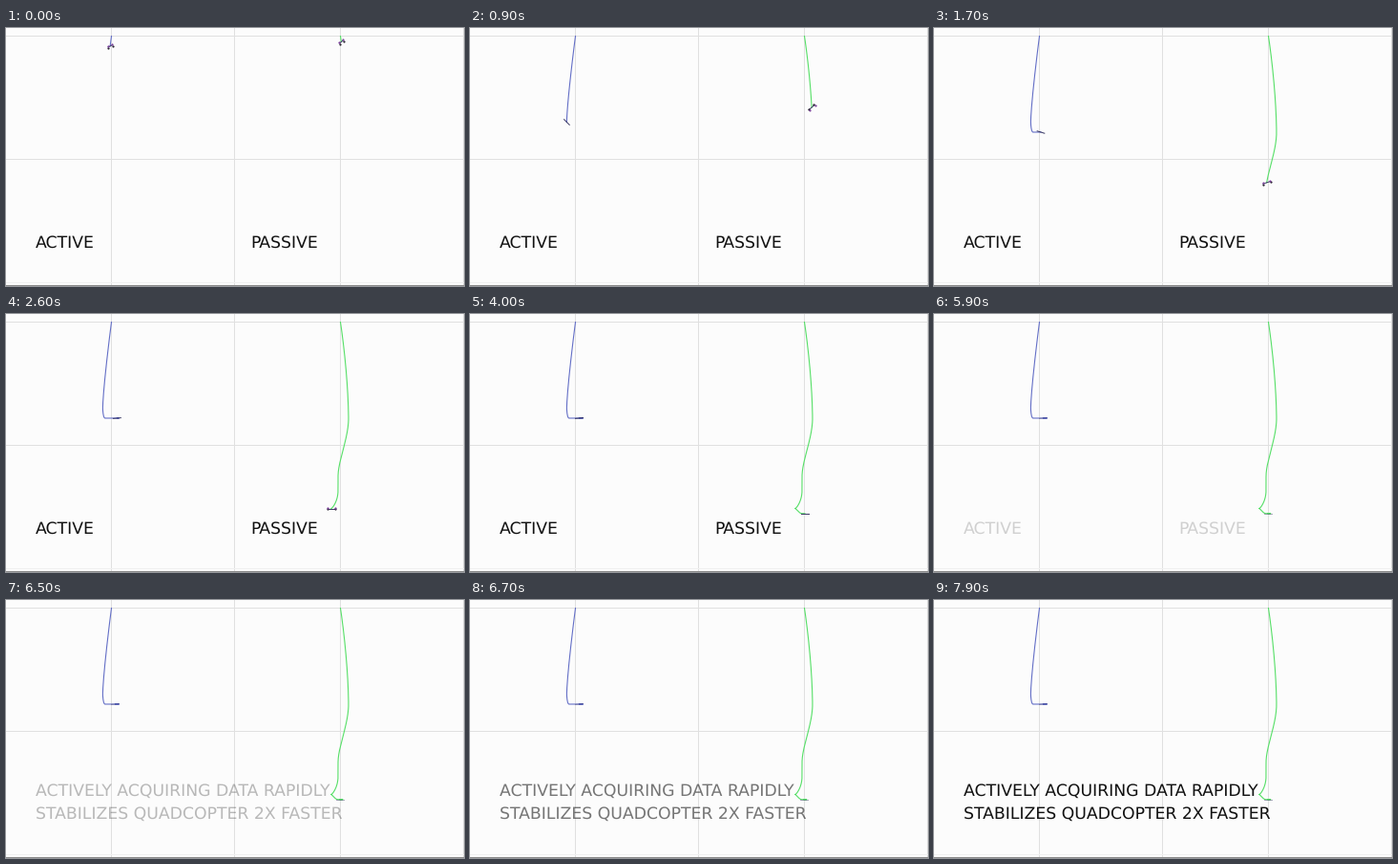
Write a matplotlib script that moves like this. It is 480 by 270 pixels and loops after 8000 ms.

```python
import numpy as np
import matplotlib.pyplot as plt
from matplotlib.animation import FuncAnimation

W, H, DPI = 480, 270, 100
FRAMES, STEP = 80, 100
PX = 72 / DPI
START = -0.3

plt.rcParams["text.hinting"] = "none"


def moves(t, value, *steps):
    """Value at t seconds after smooth steps of (change, begin, end)."""
    for change, begin, end in steps:
        u = np.clip((t - begin) / (end - begin), 0, 1)
        value = value + change * u * u * (3 - 2 * u)
    return value


def active_path(t):
    """Falls, brakes and swings back to a hover."""
    x = moves(t, 110.5, (-9.2, START, 0.95), (17, 0.85, 2.3), (-3.8, 2.3, 2.9))
    y = moves(t, 8.5, (100.5, START, 1.2))
    return x, y


def active_pose(t):
    return moves(t, -27, (72, 0, 0.9), (-50, 0.9, 2.4)), moves(t, 0.8, (-0.8, 0, 0.9))


def passive_path(t):
    """Falls much further, swaying on the way down."""
    x = moves(t, 350.5, (8.5, START, 1.2), (-11, 1.15, 1.8), (-7.3, 2.0, 2.6),
              (12.1, 2.8, 4.4), (-2.8, 4.4, 4.9))
    y = moves(t, 8.5, (195, START, 2.55), (5.3, 2.9, 3.7))
    return x, y


def passive_pose(t):
    return moves(t, -38, (398, 0, 1.95)), moves(t, 0.9, (-0.9, 1.8, 4.0))


fig = plt.figure(figsize=(W / DPI, H / DPI), dpi=DPI, facecolor="#fcfcfc")
ax = fig.add_axes([0, 0, 1, 1])
ax.set(xlim=(0, W), ylim=(H, 0))
ax.axis("off")


def rule(xs, ys, color):
    ax.plot(xs, ys, color=color, lw=PX, snap=False)


for x in (110.5, 239.5, 350.5, 479.5):
    rule([x, x], [0, H], "#e0e0e0")
for y in (8.5, 137.5):
    rule([0, W], [y, y], "#e0e0e0")
rule([0, W], [266.5, 266.5], "#f0f0f0")
rule([0, W], [269.5, 269.5], "#8c8c8c")


class Drone:
    def __init__(self, path, pose, color):
        self.path, self.pose = path, pose
        self.trail, = ax.plot([], [], color=color, lw=1.1 * PX, zorder=3)
        self.body, = ax.plot([], [], color="#2c2a58", lw=PX, zorder=4)
        self.rotors = [ax.plot([], [], "o", ms=2.2 * PX, mew=0, color=c,
                               snap=False, zorder=5)[0]
                       for c in ("#26222e", "#7a3f9a")]

    def update(self, t):
        xs, ys = self.path(np.linspace(START, t, 30 + int(t * 60)))
        self.trail.set_data(xs, ys)
        tilt, spread = self.pose(t)
        a = np.radians(tilt)
        arm = moves(t, 2.3, (1.7, 0, 0.9))
        side = arm * np.array([-1, 1])
        px, py = xs[-1] + side * np.cos(a), ys[-1] + side * np.sin(a)
        self.body.set_data(px, py)
        self.body.set_alpha(moves(t, 0.9, (-0.5, 4.4, 5.4)))
        for s, dots in zip((spread, -spread), self.rotors):
            dots.set_data(px - s * np.sin(a), py + s * np.cos(a))
            dots.set_visible(spread > 0.2)


def label(x, y, text):
    return ax.text(x, y, text, family="DejaVu Sans", size=17.2 * PX,
                   color="#111111", va="baseline", zorder=6)


drones = [Drone(active_path, active_pose, "#636ec6"),
          Drone(passive_path, passive_pose, "#55df66")]
names = [label(31, 229.3, "ACTIVE"), label(256, 229.3, "PASSIVE")]
claim = [label(31, 205.3, "ACTIVELY ACQUIRING DATA RAPIDLY"),
         label(31, 229.3, "STABILIZES QUADCOPTER 2X FASTER")]


def draw(i):
    t = i * STEP / 1000
    for d in drones:
        d.update(t)
    fade_out = np.interp(t, [5.5, 6.2], [1, 0]) ** 2
    fade_in = np.interp(t, [6.3, 7.0], [0, 1])
    for group, alpha in ((names, fade_out), (claim, fade_in)):
        for text in group:
            text.set_alpha(alpha)
            text.set_visible(alpha > 0)
    return []


anim = FuncAnimation(fig, draw, frames=FRAMES, interval=STEP, repeat=True,
                     repeat_delay=0, blit=False)
plt.show()
```
